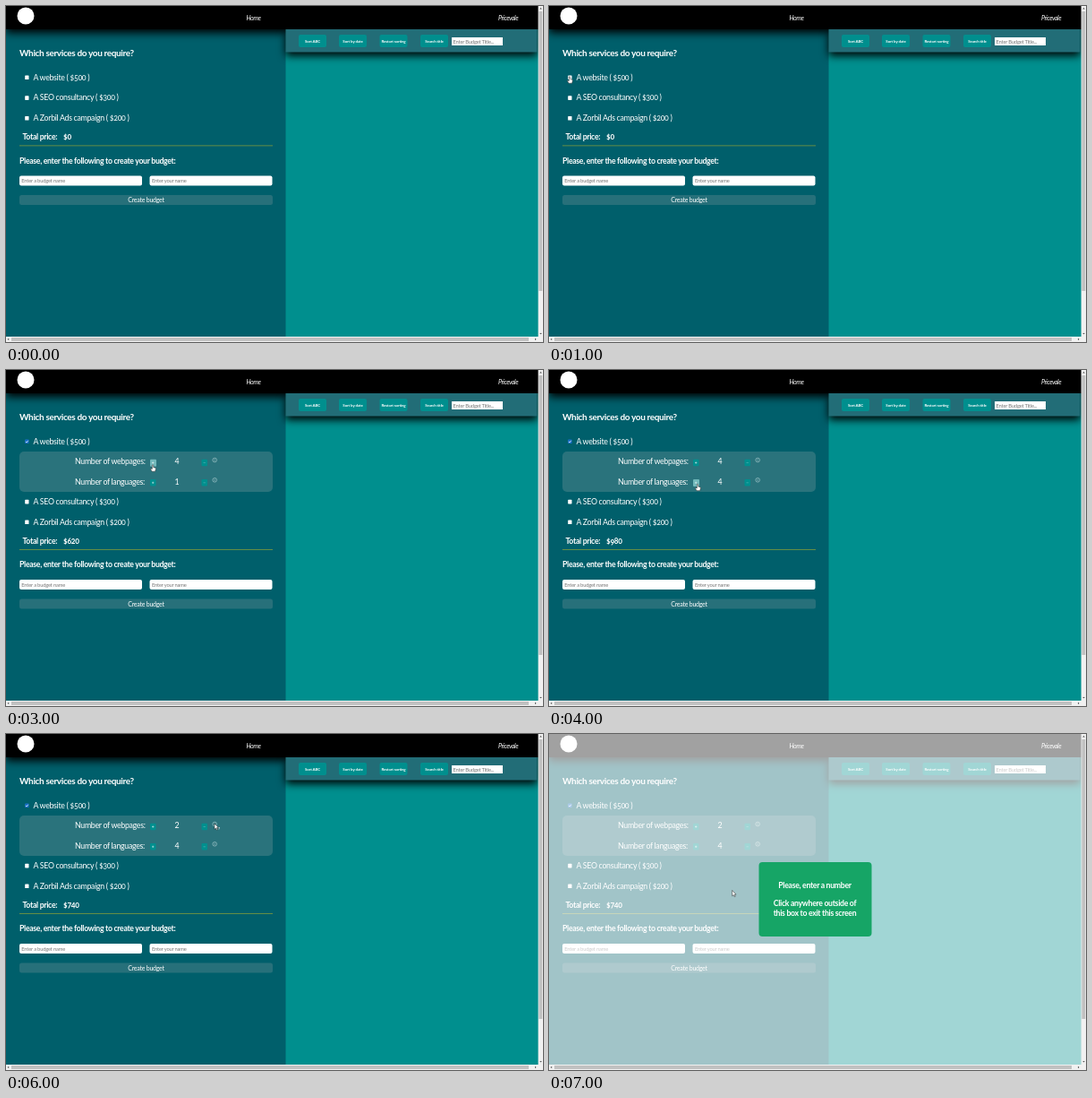
Write an HTML page that moves like this. It is 600 by 375 pixels and loops after 8 s.

```html
<!DOCTYPE html>
<html lang="en">
<head>
<meta charset="utf-8">
<title>Budget form</title>
<style>
  html, body { margin: 0; width: 100%; height: 100%; overflow: hidden; background: #f1f1f1; }
  svg { display: block; width: 100vw; height: 100vh; }
  text { font: 8.8px Lato, sans-serif; letter-spacing: -.035em; fill: #fff; white-space: pre; }
  .old { font-variant-numeric: oldstyle-nums; }
  .bold { font-size: 8.7px; font-weight: 700; }
  .title { font-size: 10px; }
  .script { font-style: italic; font-size: 7.2px; letter-spacing: -.07em; }
  .tool { font-size: 4.5px; font-weight: 700; }
  .hint { font-size: 5.8px; fill: #777; }
  .create { font-size: 7px; }
  .mid { text-anchor: middle; }
  .raised { filter: drop-shadow(0 4px 5px #000); }
</style>
</head>
<body>
<svg id="stage" viewBox="0 0 600 375" preserveAspectRatio="none">
  <defs>
    <path id="arrow" d="M0 0V6.3L1.5 5 2.5 7.2 3.5 6.8 2.5 4.6H4.4Z" fill="#fff" stroke="#222" stroke-width=".5"/>
    <path id="hand" d="M-.7 0Q0-.8.7 0V2.6L3 3.2Q3.6 3.4 3.4 4.4L2.7 7.2H-.9L-2.6 4.4Q-2.4 3.4-.7 4.5Z" fill="#fff" stroke="#222" stroke-width=".5"/>
  </defs>
  <rect width="313" height="370" fill="#005f6b"/>
  <rect x="312.5" width="282.5" height="370" fill="#008f8e"/>
  <rect class="raised" width="595" height="26"/>
  <rect class="raised" x="312.5" y="26" width="281" height="25.5" fill="#226d77"/>
  <circle cx="22" cy="11" r="9.5" fill="#fff"/>
  <text class="script mid" x="276.5" y="16">Home</text>
  <text class="script mid" x="561" y="16">Pricevale</text>
  <g id="tools"></g>
  <rect x="498" y="35" width="57" height="9" fill="#fff"/>
  <text class="hint" x="499.5" y="41.5">Enter Budget Title...</text>
  <text class="bold title" x="15" y="56">Which services do you require?</text>
  <g id="form"></g>
  <g id="modal">
    <rect width="595" height="370" fill="#fff" opacity=".63"/>
    <rect x="234.5" y="143" width="126" height="83" rx="4" fill="#16a566"/>
    <text class="bold mid" x="297" y="172">Please, enter a number</text>
    <text class="bold mid" x="297" y="191.5">Click anywhere outside of</text>
    <text class="bold mid" x="297" y="202.5">this box to exit this screen</text>
  </g>
  <g id="cursor"></g>
  <g fill="#f1f1f1">
    <path d="M594.6 0H600V375H0V369H594.6Z"/>
    <path d="M595.4 6H599.3V318H595.4ZM6 370H584V374H6Z" fill="#c1c1c1"/>
    <path d="M596.2 3.4L597.5 1.8 598.8 3.4ZM596.2 365L597.5 366.6 598.8 365ZM3.2 370.7L1.6 372 3.2 373.3ZM591 370.7L592.6 372 591 373.3Z" fill="#555"/>
  </g>
</svg>
<script>
const $ = id => document.getElementById(id);
const text = (x, y, cls, s) => `<text x="${x}" y="${y}" class="${cls}">${s}</text>`;
const box = (x, y, w, h, fill, r = 0) =>
  `<rect x="${x}" y="${y}" width="${w}" height="${h}" rx="${r}" fill="${fill}"/>`;

// One state per second
const steps = [
  {},
  { cursor: ['hand', 23, 79] },
  { pages: 1, langs: 1, hover: 'pages+', cursor: ['hand', 164, 108] },
  { pages: 4, langs: 1, hover: 'pages+', cursor: ['hand', 164, 106] },
  { pages: 4, langs: 4, hover: 'langs+', cursor: ['hand', 166, 127.5] },
  { pages: 4, langs: 4, hover: 'pages-', cursor: ['hand', 222, 105] },
  { pages: 2, langs: 4, cursor: ['arrow', 233, 100], help: true },
  { pages: 2, langs: 4, cursor: ['arrow', 204.7, 174.5], modal: true },
];

$('tools').innerHTML = [[327, 'Sort ABC'], [372, 'Sort by date'], [417.5, 'Restart sorting'], [463, 'Search title']]
  .map(([x, s]) => box(x, 32, 31, 14, '#008f8e', 2) + text(x + 15.5, 40.5, 'tool mid', s)).join('');

function service(y, label, checked) {
  const tick = `<path d="M22 ${y - 2.6}l1 1.1 1.8-2.2" fill="none" stroke="#fff" stroke-width=".7"/>`;
  return box(21.2, y - 5, 4.3, 4.6, checked ? '#1a70c8' : '#fff', .6) + (checked ? tick : '') +
    text(30.5, y, 'old', label);
}

function counter(y, name, label, value, hover) {
  const button = (x, sign) => {
    const lit = hover === name + sign;
    const plus = sign === '+';
    return box(x, y - 5.5, lit ? 7 : 6.5, lit ? 8 : 7.5, lit ? '#72b9bb' : '#008f8e', 1) +
      `<path d="M${x + 2} ${y - 1.8}h2.4${plus ? 'm-1.2-1.2v2.4' : ''}" stroke="#fff" stroke-width=".6" opacity="${plus ? .8 : .35}"/>`;
  };
  return text(77, y, '', label) + button(161, '+') + text(191, y, 'mid', value) + button(218.5, '-') +
    `<circle cx="233.2" cy="${y - 4.8}" r="2.3" fill="none" stroke="#b4d2d5" stroke-width=".6"/>
     <path d="M233.2 ${y - 6}v2.4" stroke="#b4d2d5" stroke-width=".5"/>`;
}

function form({ pages, langs, hover }) {
  const shift = pages ? 44.5 : 0;
  const price = pages ? 500 + 30 * pages * langs : 0;
  const details = pages ? box(15, 91, 283, 45, '#2a737c', 5) +
    counter(105.3, 'pages', 'Number of webpages:', pages, hover) +
    counter(127.6, 'langs', 'Number of languages:', langs, hover) : '';
  return service(82.5, 'A website ( $500 )', pages) + details + `<g transform="translate(0 ${shift})">` +
    service(105.3, 'A SEO consultancy ( $300 )') +
    service(128, 'A Zorbil Ads campaign ( $200 )') +
    text(18.5, 149, 'bold', 'Total price:') + text(64, 149, 'bold old', '$' + price) +
    box(15, 155.5, 283, .8, '#7d9a3c') +
    text(15, 175.8, 'bold', 'Please, enter the following to create your budget:') +
    box(15, 189.5, 137, 11, '#fff', 2) + text(17.3, 197.2, 'hint', 'Enter a budget name') +
    box(160.5, 189.5, 137, 11, '#fff', 2) + text(163, 197.2, 'hint', 'Enter your name') +
    box(15, 211, 283, 11, '#27707a', 2.5) + text(156.5, 219, 'create mid', 'Create budget') + '</g>';
}

let shown = -1;
function draw() {
  const now = Math.floor(performance.now() / 1000) % steps.length;
  if (now !== shown) {
    const { cursor, help, modal } = steps[shown = now];
    $('form').innerHTML = form(steps[now]);
    $('modal').style.display = modal ? '' : 'none';
    $('cursor').innerHTML = (cursor ? `<use href="#${cursor[0]}" x="${cursor[1]}" y="${cursor[2]}"/>` : '') +
      (help ? text(237, 107, 'tool', '?') : '');
  }
  requestAnimationFrame(draw);
}
draw();
</script>
</body>
</html>
```
